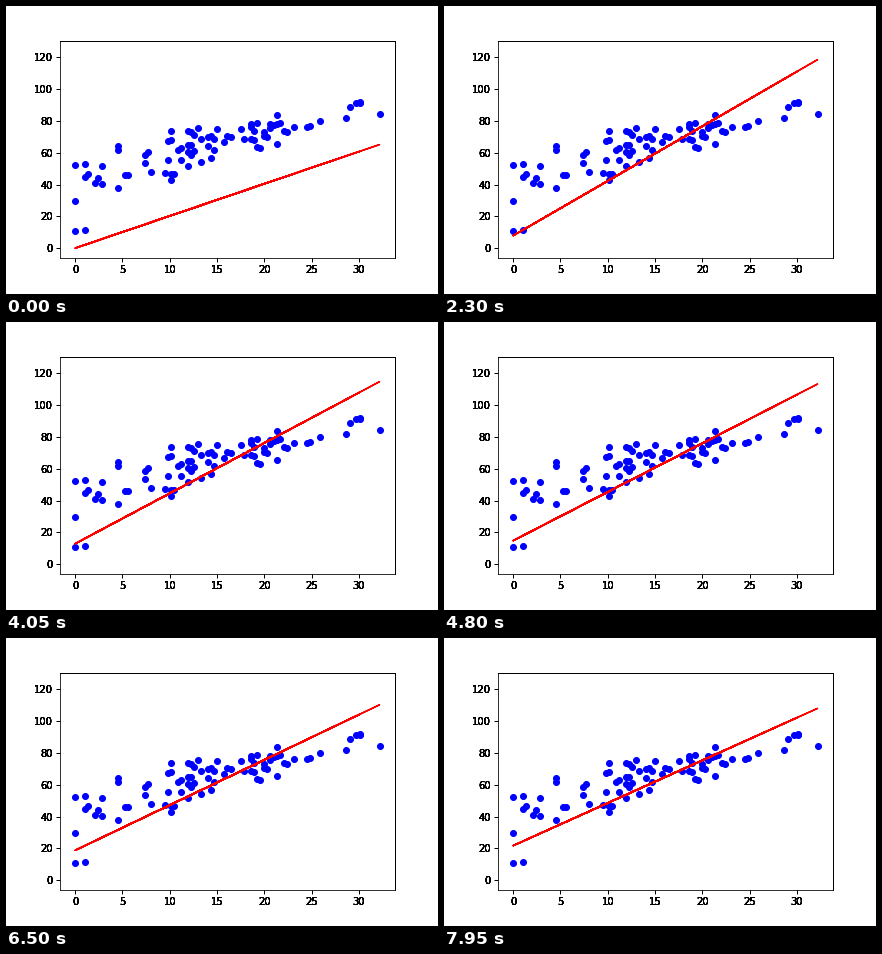
These frames come from a looping animation (432x288 px, 8 s). A matplotlib script:

```python
import math
import random

import matplotlib.pyplot as plt
from matplotlib.animation import FuncAnimation

FRAMES, INTERVAL = 160, 50
STEP = 0.35  # spacing of the x grid
X_MAX = 92 * STEP

# grid index -> measured values
DATA = {
    0: [52.2, 29.5, 10.8], 3: [53, 45, 11.5], 4: [47], 6: [41], 7: [44],
    8: [51.5, 40.3], 13: [64, 61.5, 38], 15: [46], 16: [46],
    21: [58.7, 53.5], 22: [60.8], 23: [47.8], 27: [47.2], 28: [67.2, 55.3],
    29: [74, 68, 46.5, 42.8], 30: [47], 31: [61.5], 32: [62.8, 55.2],
    34: [74, 65, 60.5, 51.5], 35: [73.2, 64.8, 58.5], 36: [71, 61],
    37: [75.5], 38: [68.5, 54], 40: [69.8, 64], 41: [70.3, 56.5],
    42: [69, 61.5], 43: [74.7], 45: [67], 46: [70.3], 47: [69.7],
    50: [74.7], 51: [69], 53: [78, 76.2, 68.5], 54: [74, 68.3],
    55: [78.5, 63.5], 56: [63], 57: [72.8, 70.5], 58: [69.7],
    59: [78, 75.8], 60: [77.8], 61: [84, 78, 65.3], 62: [78.5], 63: [74],
    64: [72.8], 66: [76.5], 70: [76], 71: [76.7], 74: [80], 82: [81.7],
    83: [88.7], 85: [91], 86: [92.2, 91.5], 92: [84.2],
}
points = [(n * STEP, y) for n, ys in DATA.items() for y in ys]
random.Random(4).shuffle(points)
xs, ys = zip(*points)


def fit(k):
    """Intercept and slope of the gradient descent at frame k."""
    if k == 0:
        return 0.13, 2.02
    b = 45 - 44.55 * math.exp(-0.00413 * (k - 1))
    return b, 3.872 - 0.05475 * b


def padded(lo, hi):
    pad = 0.05 * (hi - lo)
    return lo - pad, hi + pad


def label(value, axis):
    """Tick label, layered so that its edges come out hard."""
    if axis == "x":
        place = dict(xy=(value, 0), xycoords=ax.get_xaxis_transform(),
                     xytext=(0, -7), ha="center", va="top")
    else:
        place = dict(xy=(0, value), xycoords=ax.get_yaxis_transform(),
                     xytext=(-7, 0), ha="right", va="center_baseline")
    for _ in range(8):
        ax.annotate(str(value), textcoords="offset points", fontsize=10,
                    family="DejaVu Sans", annotation_clip=False, **place)


fig = plt.figure(figsize=(6, 4), dpi=72, facecolor="white")
fig.subplots_adjust(left=0.125, right=0.9, bottom=0.125, top=0.88)
ax = fig.add_subplot()

b1, m1 = fit(1)
ax.set_xlim(padded(0, X_MAX))
ax.set_ylim(padded(fit(0)[0], b1 + m1 * X_MAX))
ax.set_xticks(range(0, 31, 5))
ax.set_yticks(range(0, 121, 20))
ax.tick_params(length=4, width=1, labelbottom=False, labelleft=False)
for side in ("right", "top"):
    ax.spines[side].set_linewidth(1)
for value in range(0, 31, 5):
    label(value, "x")
for value in range(0, 121, 20):
    label(value, "y")

ax.plot(xs, ys, "bo", markersize=6)
line, = ax.plot([], [], "r", linewidth=1.5)


def update(k):
    b, m = fit(k)
    line.set_data(xs, [b + m * x for x in xs])
    return line,


anim = FuncAnimation(fig, update, frames=FRAMES, interval=INTERVAL,
                     init_func=lambda: update(0), repeat=True, repeat_delay=0)
plt.show()
```
